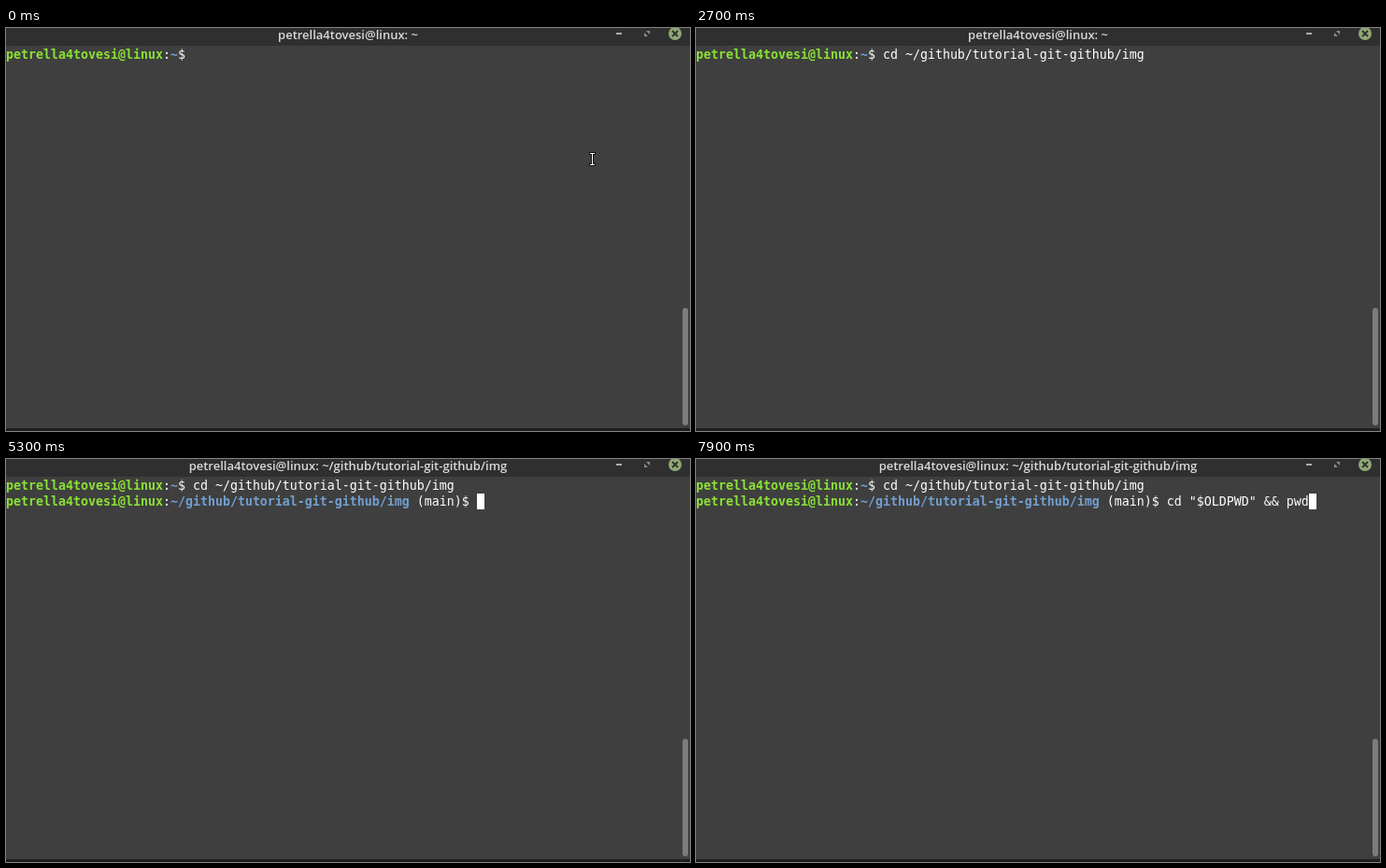
Write an HTML page that moves like this. It is 732 px wide and 432 px high and loops after 8 s.

```html
<!DOCTYPE html>
<html lang="en">
<head>
<meta charset="utf-8">
<title>Terminal</title>
<style>
html, body { margin: 0; width: 732px; height: 432px; overflow: hidden; background: #3f3f3f; }
body { position: relative; }
#bar { position: absolute; inset: 0 0 auto; height: 19px; background: #2f2f2f; }
#title { position: absolute; top: -2px; width: 732px; text-align: center; color: #dadada;
  font: 600 13px/18px "Open Sans", sans-serif; white-space: pre; }
#screen { position: absolute; left: 0; top: 20px; margin: 0; color: #fff;
  font: 13.29px/17px "DejaVu Sans Mono", monospace; }
#screen b { color: #8ae234; }
#screen b.path { color: #729fcf; }
#cursor { position: absolute; width: 8px; height: 17px; background: #fff; }
svg { position: absolute; left: 0; top: 0; }
</style>
</head>
<body>
<div id="bar"></div>
<div id="title"></div>
<pre id="screen"></pre>
<div id="cursor"></div>
<svg width="732" height="432">
  <path d="M653 6h6" stroke="#acacac" stroke-width="2"/>
  <path d="M685 3h4v4zM683 5v4h4z" fill="#8c8c8c"/>
  <circle cx="716" cy="6" r="7" fill="#8fa876"/>
  <path d="M713 3l6 6m0-6l-6 6" stroke="#2f2f2f" stroke-width="1.8"/>
  <rect x="724" y="300" width="6" height="126" rx="3" fill="#7c7c7c"/>
  <path d="M0 429h732v3H0z" fill="#1e1e1e"/>
  <g id="pointer" fill="none" stroke-linecap="square">
    <path d="M625.5 134.5h4m-2 0v12m-2 0h4" stroke="#111" stroke-width="3"/>
    <path d="M625.5 134.5h4m-2 0v12m-2 0h4" stroke="#fff"/>
  </g>
</svg>
<script>
const LOOP = 8000, COLUMNS = 90, CELL = 8, ROW = 17, TOP = 20;
const user = "petrella4tovesi@linux";
const dir = "~/github/tutorial-git-github/img";
const goDir = "cd " + dir;
const goBack = 'cd "$OLDPWD" && pwd';
const blinks = [400, 1500, 2100, 2700, 3300, 3900, 4000, 4700, 5300, 5900, 6500, 7100, 7400];
const $ = id => document.getElementById(id);

const prompt = (path, branch = "") =>
  ({ html: `<b>${user}</b>:<b class="path">${path}</b>${branch}$ `,
     length: user.length + path.length + branch.length + 3 });
const home = prompt("~"), work = prompt(dir, " (main)");
const escapeHtml = text => text.replace(/&/g, "&amp;");

function render(t) {
  const entered = t >= 4100;
  const current = entered ? work : home;
  const command = entered
    ? (t < 7500 ? "" : t < 7900 ? goDir : goBack)
    : (t < 700 ? "" : t < 900 ? goBack : goDir);
  const room = COLUMNS - current.length;
  const wrapped = command.length > room
    ? command.slice(0, room) + "\n" + command.slice(room) : command;
  const end = current.length + command.length;

  $("title").textContent = `${user}: ${entered ? dir : "~"}`;
  $("screen").innerHTML = (entered ? home.html + goDir + "\n" : "") + current.html + escapeHtml(wrapped);
  $("cursor").style.left = end % COLUMNS * CELL + "px";
  $("cursor").style.top = TOP + (entered + Math.floor(end / COLUMNS)) * ROW + "px";
  // Each listed time toggles the cursor, which starts hidden.
  $("cursor").hidden = blinks.filter(time => time <= t).length % 2 === 0;
  $("pointer").style.display = t < 600 ? "" : "none";
}

const start = performance.now();
function tick() {
  render((performance.now() - start) % LOOP);
  requestAnimationFrame(tick);
}
tick();
</script>
</body>
</html>
```
